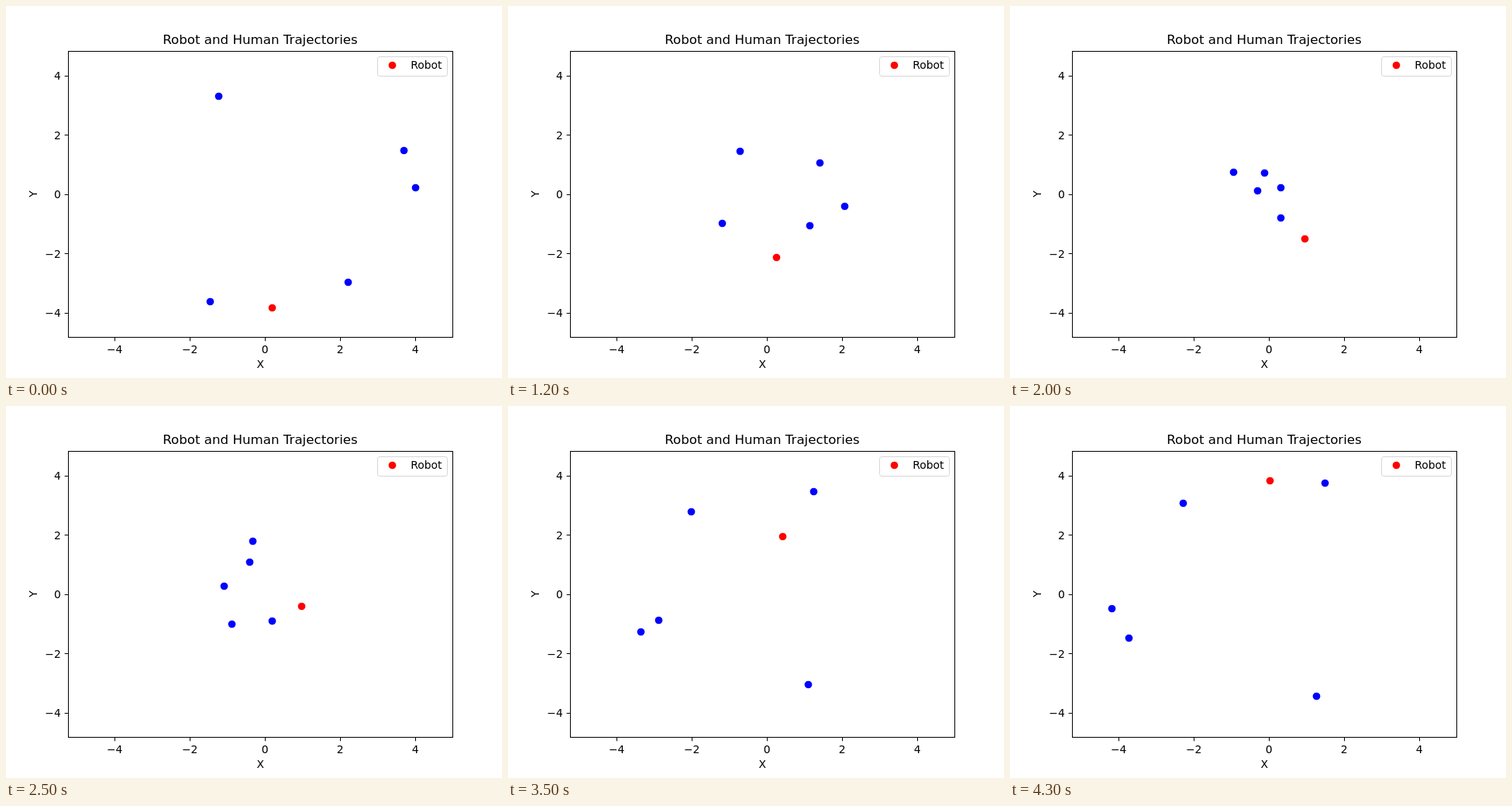
These frames come from a looping animation (640x480 px, 4.4 s). An HTML page:

```html
<!DOCTYPE html>
<html lang="en">
<head>
<meta charset="utf-8">
<title>Robot and Human Trajectories</title>
<style>
  html, body { margin: 0; width: 100%; height: 100%; overflow: hidden; background: #fff; }
  svg { display: block; width: 640px; height: 480px; }
  text { font: 13.89px "DejaVu Sans", sans-serif; }
  .title { font-size: 16.67px; }
  .mid { text-anchor: middle; }
  .end { text-anchor: end; }
  .axes { fill: none; stroke: #000; }
</style>
</head>
<body>
<svg viewBox="0 0 640 480">
  <text class="title mid" x="328" y="49">Robot and Human Trajectories</text>
  <text class="mid" x="328.3" y="467">X</text>
  <text class="mid" transform="translate(40 242.5) rotate(-90)">Y</text>
  <g id="ticks"></g>
  <g id="dots"></g>
  <rect class="axes" x="80.5" y="58.5" width="496" height="369"/>
  <rect x="479.5" y="65.5" width="90" height="25" rx="2.8" fill="#fff" stroke="#d6d6d6"/>
  <circle cx="498.5" cy="76.5" r="4.86" fill="#f00"/>
  <text x="522.2" y="81">Robot</text>
</svg>
<script>
const STEP_MS = 100, STEPS = 44;
const UNIT_X = 48.5, UNIT_Y = 38.2;   // pixels per plot unit
const STRIDE = 0.25;                  // plot units per step at full speed

// Each path holds a few [step, x, y] points; after them the agent heads for its goal.
const human = (goal, ...path) => ({ color: '#00f', goal, path });
const agents = [
  human([395.5, 375.2], [0, 274, 116], [20, 319, 238], [25, 343, 276.6]),
  human([148.3, 301.7], [0, 513, 186], [20, 328, 215], [25, 281, 232], [35, 194, 276]),
  human([134, 252], [0, 528, 234], [12, 434, 258], [25, 291, 281], [35, 171, 291], [40, 128, 274]),
  human([221.5, 124], [0, 441, 356], [20, 349, 234], [25, 314, 201]),
  human([407.5, 98.2], [0, 263, 381], [20, 288, 214], [25, 318, 174]),
  { color: '#f00',
    path: [[0, 343, 389], [7, 355, 344], [12, 346, 324], [18, 362, 313],
           [20, 380, 300], [22, 394, 286], [25, 381, 258], [43, 335, 96]] }
];

function add(parent, tag, attrs, text = '') {
  const node = document.createElementNS('http://www.w3.org/2000/svg', tag);
  for (const name in attrs) node.setAttribute(name, attrs[name]);
  node.textContent = text;
  return parent.appendChild(node);
}

// Monotone cubic interpolation of one coordinate (axis 1 = x, 2 = y).
function interpolate(path, axis, t) {
  const secant = i => (path[i + 1][axis] - path[i][axis]) / (path[i + 1][0] - path[i][0]);
  const slope = i => {
    if (i === 0) return secant(0);
    if (i === path.length - 1) return secant(i - 1);
    const a = secant(i - 1), b = secant(i);
    return a * b > 0 ? 2 * a * b / (a + b) : 0;
  };
  let i = 0;
  while (i < path.length - 2 && t > path[i + 1][0]) i++;
  const h = path[i + 1][0] - path[i][0], u = (t - path[i][0]) / h, v = 1 - u;
  return path[i][axis] * v * v * (1 + 2 * u) + path[i + 1][axis] * u * u * (3 - 2 * u)
       + h * u * v * (slope(i) * v - slope(i + 1) * u);
}

// Full speed until one unit away, then proportional to the distance left.
function seek([x, y], goal, steps) {
  for (; steps > 0; steps--) {
    const dx = goal[0] - x, dy = goal[1] - y;
    const part = STRIDE / Math.max(1, Math.hypot(dx / UNIT_X, dy / UNIT_Y));
    x += dx * part;
    y += dy * part;
  }
  return [x, y];
}

function position({ path, goal }, step) {
  const [last, x, y] = path[path.length - 1];
  return step > last ? seek([x, y], goal, step - last)
                     : [interpolate(path, 1, step), interpolate(path, 2, step)];
}

const ticks = document.getElementById('ticks');
for (let value = -4; value <= 4; value += 2) {
  const label = String(value).replace('-', '\u2212');
  const x = 334 + UNIT_X * value, y = 243 - 38.25 * value;
  add(ticks, 'path', { class: 'axes', d: `M${x + 0.5} 427.5v4.86M80.5 ${Math.floor(y) + 0.5}h-4.86` });
  add(ticks, 'text', { class: 'mid', x: x + 0.2, y: 448 }, label);
  add(ticks, 'text', { class: 'end', x: 70.8, y: Math.round(y + 5) }, label);
}

const layer = document.getElementById('dots');
const dots = agents.map(({ color }) => add(layer, 'circle', { r: 4.86, fill: color }));

function draw() {
  const step = Math.floor(performance.now() / STEP_MS) % STEPS;
  agents.forEach((agent, i) => {
    const [x, y] = position(agent, step);
    dots[i].setAttribute('cx', Math.round(x) + 0.5);
    dots[i].setAttribute('cy', Math.round(y) + 0.5);
  });
  requestAnimationFrame(draw);
}
draw();
</script>
</body>
</html>
```
